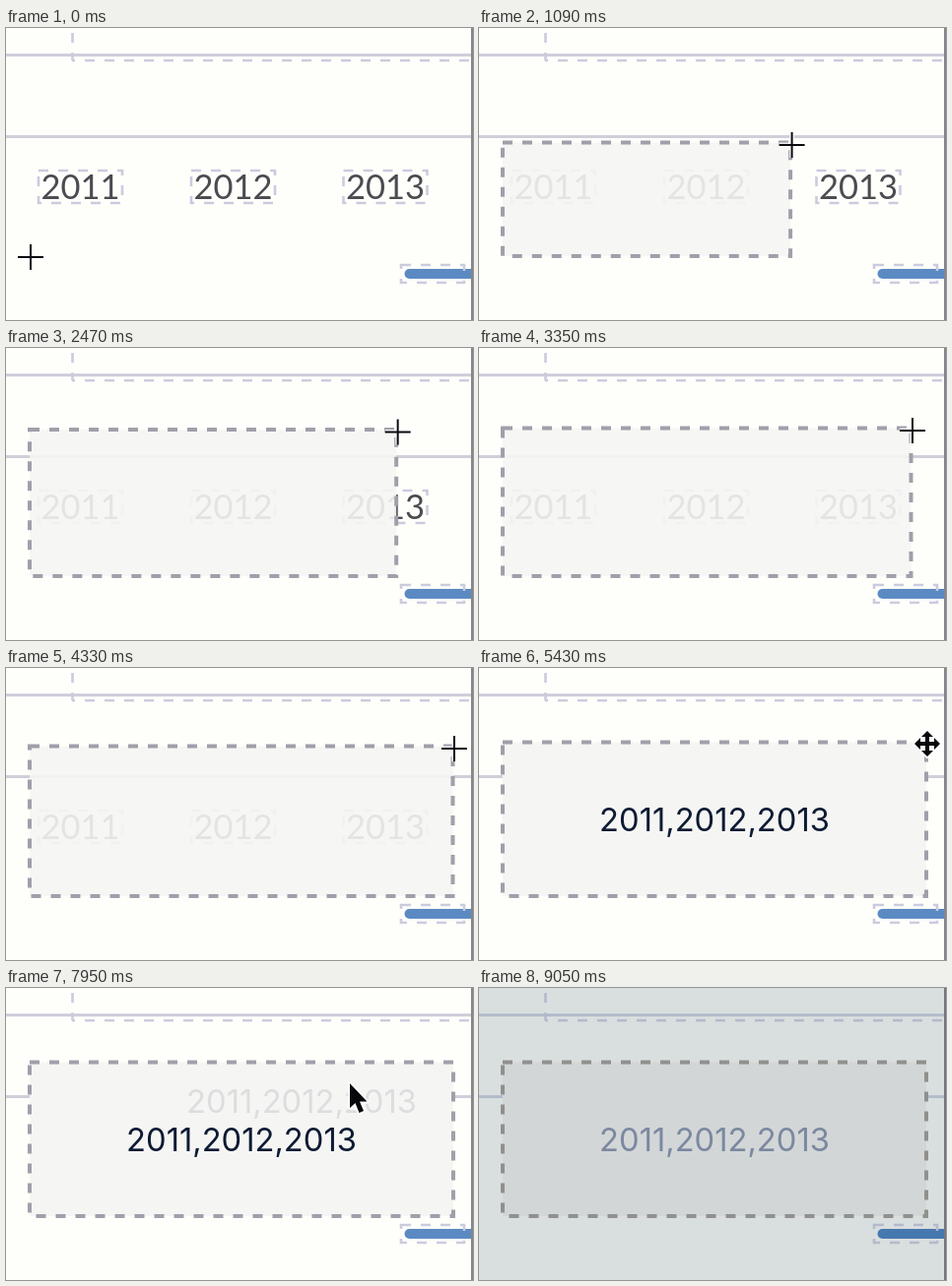
An HTML page for the animation above (9.07 s loop, 474 by 297 pixels).

```html
<!DOCTYPE html>
<html lang="en">
<head>
<meta charset="utf-8">
<title>Drag to group labels</title>
<style>
  html, body { margin: 0; width: 100%; height: 100%; overflow: hidden; }
  svg {
    display: block; width: 474px; height: 297px;
    --bg: #fefefb; --line: #cfcfda; --dash: #cbcbde; --bar: #5b8ac2;
    --edge: #85858c; --fill: #f5f5f3; --frame: #a0a0aa; --ink: #0c1a33;
  }
  svg.dim {
    --bg: #d9dfde; --line: #b4bccb; --dash: #b4b9cc; --bar: #4678b0;
    --edge: #74777d; --fill: #d3d6d7; --frame: #90908e; --ink: #7b88a0;
  }
  .bg { fill: var(--bg); }
  .line { stroke: var(--line); stroke-width: 3; }
  .edge { stroke: var(--edge); stroke-width: 2; }
  .dash { fill: none; stroke: var(--dash); stroke-width: 2.6; stroke-dasharray: 10 10; }
  .bar { stroke: var(--bar); stroke-width: 10; stroke-linecap: round; }
  .label { font: 34.5px Lato, sans-serif; fill: #4b4b50; }
  .fill { fill: var(--fill); }
  .frame { fill: none; stroke: var(--frame); stroke-width: 4; stroke-dasharray: 10 10; }
  .merged { font: 32.7px Inter, sans-serif; fill: var(--ink); text-anchor: middle; }
  .ghost { opacity: .1; }
  .halo { stroke: #fff; stroke-width: 5; opacity: .8; }
  .cross { stroke: #0c0c10; stroke-width: 2; }
  .solid { fill: #08080a; stroke: #fff; stroke-width: 4; stroke-linejoin: round; paint-order: stroke; }
</style>
</head>
<body>
<svg id="stage" viewBox="0 0 474 297">
  <rect class="bg" width="474" height="297"/>
  <path class="line" d="M0 27.500H472M0 110.500H472"/>
  <path class="dash" d="M67.500 5V33"/>
  <path class="dash" d="M67 33H472" stroke-dashoffset="7"/>
  <path class="bar" d="M409.500 250H480"/>
  <path class="dash" d="M401 241H465V259H401Z"/>
  <path class="edge" d="M473 0V297"/>
  <g id="labels">
    <rect class="dash" x="33" y="145" width="85" height="33"/>
    <rect class="dash" x="188" y="145" width="85" height="33"/>
    <rect class="dash" x="342.500" y="145" width="85" height="33"/>
    <text class="label" x="35.500" y="173.500">2011</text>
    <text class="label" x="190.500" y="173.500">2012</text>
    <text class="label" x="345" y="173.500">2013</text>
  </g>
  <g id="area">
    <rect class="fill" id="fill" x="24"/>
    <path class="frame" id="frame"/>
  </g>
  <text class="merged ghost" id="ghost" y="166">2011,2012,2013</text>
  <text class="merged" id="merged" x="239" y="166">2011,2012,2013</text>
  <g id="cross">
    <path class="halo" d="M-13 0H13M0 -13V13"/>
    <path class="cross" d="M-13 0H13M0 -13V13"/>
  </g>
  <path class="solid" id="move" d="M0 -13L6 -7H2V-2H7V-6L13 0L7 6V2H2V7H6L0 13L-6 7H-2V2H-7V6L-13 0L-7 -6V-2H-2V-7H-6Z"/>
  <path class="solid" id="arrow" d="M1 1V26L6.500 21L10.500 31L15 29L11 19.500H18.500Z"/>
</svg>
<script>
  const LOOP = 9070, PRESS = 300, RELEASE = 5410, DRAG = 7090, DIM = 7970;
  const BASE = 232, LEFT = 24;
  // time, x, y of the pointer
  const path = [
    [0, 25, 233], [80, 23, 234], [PRESS, 25, 234], [1110, 325, 116],
    [1810, 355.5, 86], [3070, 436, 85], [3350, 440, 84],
    [4050, 452, 82], [4330, 455, 82], [5200, 455, 77], [5700, 455, 77],
    [6110, 421, 86], [6570, 304, 138], [6850, 287, 135], [DRAG, 287, 135],
    [7950, 348, 96], [LOOP, 348, 96]
  ];
  const $ = id => document.getElementById(id);
  const show = (id, on) => { $(id).style.display = on ? '' : 'none'; };
  const place = (id, x, y) => $(id).setAttribute('transform', `translate(${x} ${y})`);

  // The picture steps in groups of 20, 20 and 100 ms.
  function step(t) {
    if (t < 230) return t < 20 ? 0 : t < 50 ? 20 : t < 80 ? 50 : 80;
    const phase = (t - 230) % 140;
    return t - phase + Math.min(40, Math.floor(phase / 20) * 20);
  }

  function pointer(t) {
    const i = path.findIndex(p => p[0] > t);
    const [t0, x0, y0] = path[i - 1], [t1, x1, y1] = path[i];
    const k = (t - t0) / (t1 - t0);
    return [x0 + (x1 - x0) * k, y0 + (y1 - y0) * k];
  }

  function draw(now) {
    const t = step(now % LOOP);
    const [x, y] = pointer(t);
    const merged = t >= RELEASE;
    const right = merged ? 454 : x - 1.5;
    const top = merged ? 75.5 : y - 2.5;
    const w = Math.max(0, right - LEFT), h = Math.max(0, BASE - top);

    $('stage').classList.toggle('dim', t >= DIM);
    show('labels', !merged);
    show('area', t > PRESS);
    const fill = $('fill');
    fill.setAttribute('y', top);
    fill.setAttribute('width', w);
    fill.setAttribute('height', h);
    fill.setAttribute('opacity', merged ? 1 : .9);
    $('frame').setAttribute('d', `M${LEFT} ${top}h${w}v${h}h${-w}Z`);

    show('merged', merged);
    show('ghost', t > DRAG && t < DIM);
    place('ghost', 239 + x - 287, y - 135);

    show('cross', !merged);
    show('move', merged && t < DRAG);
    show('arrow', t >= DRAG && t < DIM);
    ['cross', 'move', 'arrow'].forEach(id => place(id, x, y));
  }

  const start = performance.now();
  function tick() {
    draw(performance.now() - start);
    requestAnimationFrame(tick);
  }
  draw(0);
  requestAnimationFrame(tick);
</script>
</body>
</html>
```
